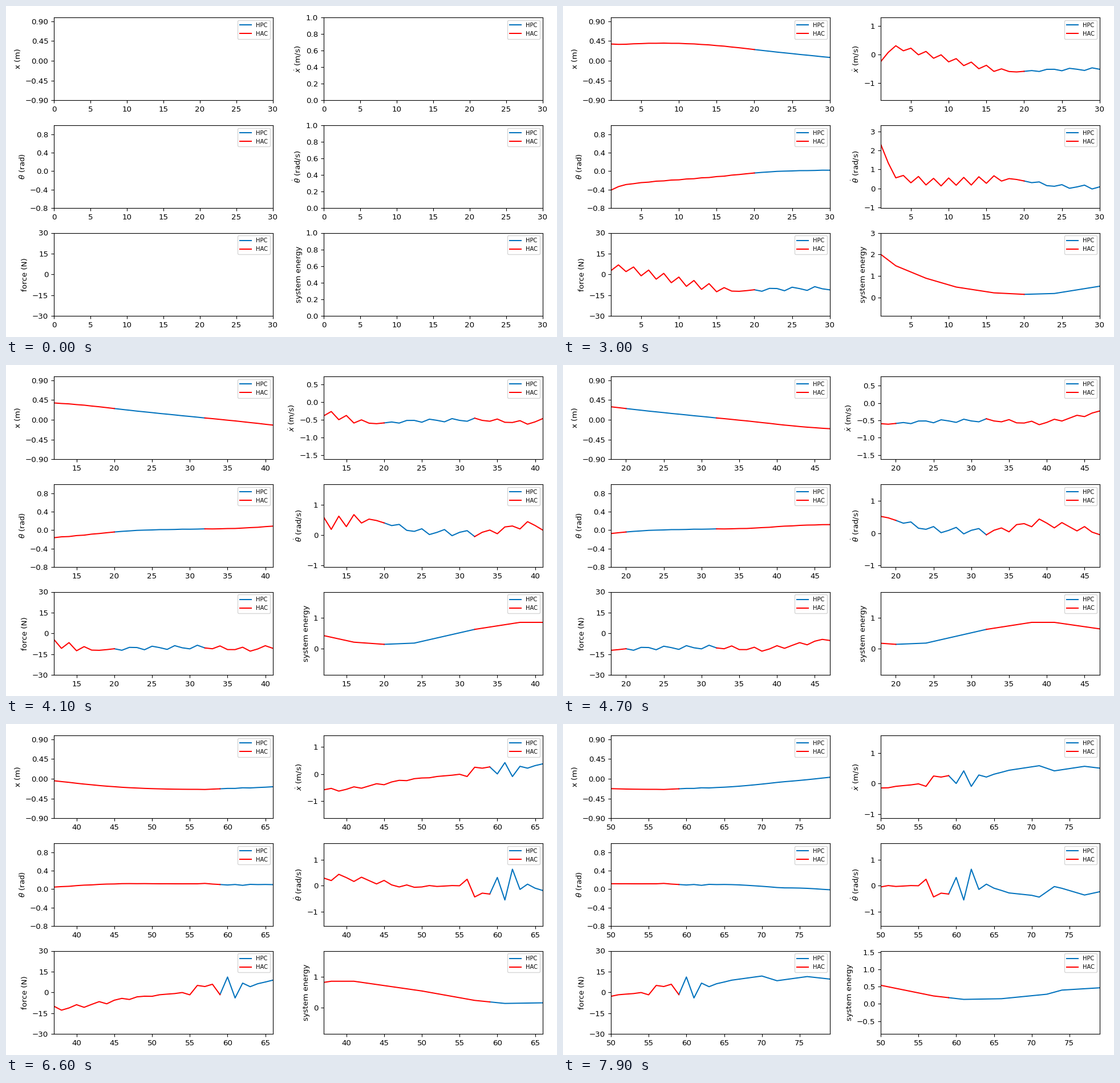
These frames come from a looping animation (966 px wide and 580 px high, 8000 ms). A matplotlib script:

```python
import numpy as np
import matplotlib.pyplot as plt
from matplotlib.animation import FuncAnimation

W, H, DPI = 966, 580, 100
STEPS, SPAN, DT = 80, 30, 1 / 30
BLUE, RED = "#0072BD", "red"

plt.rcParams.update({"font.family": "DejaVu Sans", "font.size": 9.66})

# One extra step, because the force acts on the next velocity.
steps = np.arange(STEPS + 1)
t = steps[:-1]


def curve(*points):
    """Straight pieces through (step, value) key points."""
    return np.interp(steps, *zip(*points))


def plateau(center, half):
    """Flat-topped envelope."""
    return 1 / (1 + ((steps - center) / half) ** 8)


def integrate(start, rate):
    """Forward Euler."""
    return start + DT * np.concatenate([[0], np.cumsum(rate[:-1])])


# Cart velocity: a slow trend, chatter on every other step and a faint ripple.
trend = curve((0, -.86), (1, -.26), (2, .1), (3, .265), (5, .14), (9, -.1),
              (12, -.3), (16, -.52), (19, -.61), (24, -.53), (33, -.5),
              (39, -.59), (43, -.44), (48, -.21), (55, -.01), (56, -.09),
              (57, .25), (62, .13), (64, .24), (67, .44), (71, .59),
              (73, .42), (77, .57), (80, .48))
burst = .27 * np.exp(-((steps - 61.2) / 1.8) ** 2)
chatter = -np.cos(np.pi * steps) * (.09 * plateau(10, 7) + burst)
ripple = .05 * np.cos(2 * np.pi * (steps - 35) / 2.9) * plateau(35, 14)
jitter = chatter + ripple
vel = trend + jitter

# The pole swings against the cart around a smooth momentum.
momentum = curve((0, 2.04), (4, .98), (8, .25), (13, -.4), (19, -.87),
                 (25, -1.05), (33, -1.05), (40, -.92), (48, -.5),
                 (60, .33), (70, .85), (74, .91), (80, .89))
omega = momentum - 2.2 * vel

pos = integrate(.412, vel)
theta = integrate(-.543, omega)
force = 20 * (trend + 1.5 * jitter)[1:] + 10 * np.exp(-2 * t)
energy = curve((0, 2.27), (3, 1.47), (7, .89), (11, .48), (16, .21),
               (20, .14), (24, .18), (32, .63), (38, .86), (41, .86),
               (50, .54), (57, .23), (61, .13), (66, .15), (72, .28),
               (74, .4), (80, .48))

# Control hands over between the two controllers at these steps.
hpc_on = ((t >= 20) & (t <= 32)) | (t >= 59)
hac_on = (t <= 20) | ((t >= 32) & (t <= 59))

fig = plt.figure(figsize=(W / DPI, H / DPI), dpi=DPI, facecolor="white")


class Panel:
    def __init__(self, row, col, data, label, ticks=None, ylim=None):
        left, bottom = 84 + 473 * col, 414.7 - 188.8 * row
        self.ax = fig.add_axes([left / W, bottom / H, 383.8 / W, 145.4 / H])
        self.data = data[:STEPS]
        self.auto = ticks is None
        self.lines = []
        for name, color, on in (("HPC", BLUE, hpc_on), ("HAC", RED, hac_on)):
            line, = self.ax.plot([], [], color=color, lw=1.45, label=name)
            self.lines.append((line, np.where(on, self.data, np.nan)))
        self.ax.set_ylabel(label)
        if not self.auto:
            self.ax.set_yticks(ticks)
            self.ax.set_ylim(ylim)
        self.ax.legend(loc="upper right", fontsize=7.1)

    def update(self, n):
        first = max(0, n - SPAN + 1)
        for line, values in self.lines:
            line.set_data(t[:n + 1], values[:n + 1])
        self.ax.set_xlim((0, SPAN) if n < SPAN else (first, n))
        if self.auto:
            seen = self.data[first:n + 1]
            self.ax.set_ylim((seen.min() - 1, seen.max() + 1) if n else (0, 1))


panels = [
    Panel(0, 0, pos, "x (m)", np.linspace(-.9, .9, 5), (-.9, .99)),
    Panel(0, 1, vel, r"$\dot{x}$ (m/s)"),
    Panel(1, 0, theta, r"$\theta$ (rad)", np.linspace(-.8, .8, 5), (-.8, 1)),
    Panel(1, 1, omega, r"$\dot{\theta}$ (rad/s)"),
    Panel(2, 0, force, "force (N)", np.linspace(-30, 30, 5), (-30, 30)),
    Panel(2, 1, energy, "system energy"),
]


def draw(n):
    for panel in panels:
        panel.update(n)
    return []


anim = FuncAnimation(fig, draw, frames=STEPS, init_func=lambda: draw(0),
                     interval=100, repeat=True, repeat_delay=0, blit=False)
plt.show()
```
